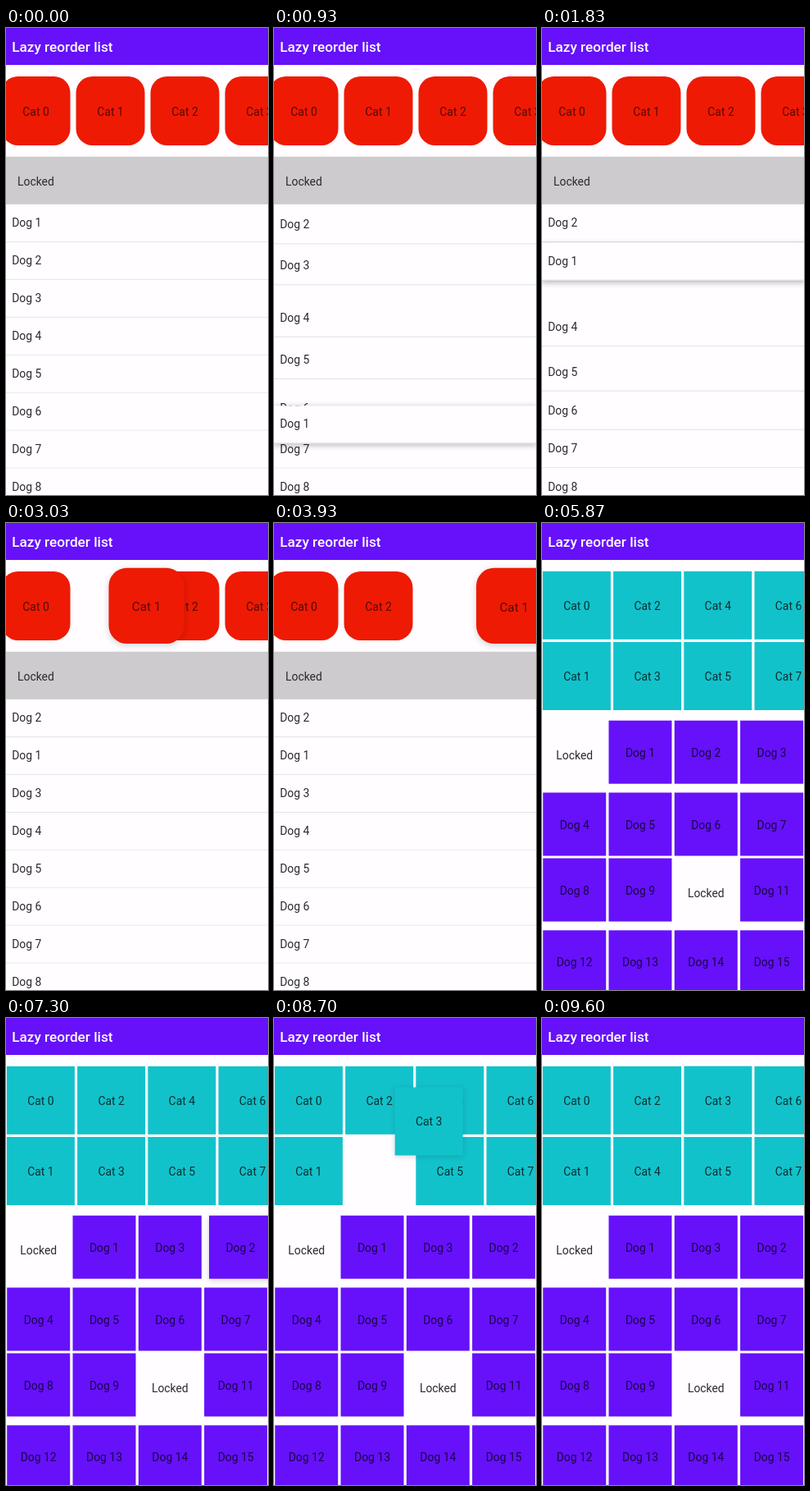
Animation of 320 by 569 pixels, one loop 9630 ms. Source, as an HTML page:

```html
<!DOCTYPE html>
<html lang="en">
<head>
<meta charset="utf-8">
<title>Lazy reorder list</title>
<style>
  html, body { margin: 0; width: 100%; height: 100%; overflow: hidden; background: #fffdff; }
  body { font: 13.9px Roboto, sans-serif; color: #2b292d; }
  section { position: absolute; inset: 0; overflow: hidden; }
  header, .item { position: absolute; display: flex; align-items: center; box-sizing: border-box; white-space: pre; }
  header {
    left: 0; top: 0; width: 100%; height: 45px; padding: 1px 0 0 7.2px;
    background: #6611fa; color: #fff; font-weight: 500; font-size: 17.2px;
  }
  .item { left: 0; top: 0; justify-content: center; --shade: .14; }
  .row {
    width: 320px; height: 45.9px; padding-left: 7.2px; justify-content: flex-start;
    background: #fffdff; border-bottom: 1px solid #e3e1e6; --shade: .28;
  }
  .bar { width: 320px; height: 58.4px; padding: 1.5px 0 0 14px; justify-content: flex-start; background: #cecbce; }
  .pill { width: 84px; height: 84px; padding-top: 1px; border-radius: 20px; background: #ee1a04; color: #560a02; }
  .teal { width: 83px; height: 83px; background: #12c2cb; color: #07302f; }
  .violet { width: 77px; height: 77px; background: #6611fa; color: #1a0548; }
  .lock { width: 77px; height: 84.5px; }
</style>
</head>
<body>
<section id="list"></section>
<section id="grid"></section>
<header>Lazy reorder list</header>
<script>
const LOOP = 9630, CUT = 5870;
const ROW = 45.9, PILL = 91, TEAL = 86.2, VIOLET = 80.3;
const list = document.getElementById('list'), grid = document.getElementById('grid');
const items = [];

// Critically damped spring, 0 to 1, from a time difference in ms
function spring(ms) {
  const k = Math.max(0, ms) / 50;
  return 1 - (1 + k) * Math.exp(-k);
}

// Smooth curve through key points [time, value]
function follow(keys, t) {
  const last = keys.length - 1;
  if (t <= keys[0][0]) return keys[0][1];
  if (t >= keys[last][0]) return keys[last][1];
  const i = keys.findIndex(k => k[0] > t) - 1;
  const slope = j => j <= 0 || j >= last ? 0 :
    (keys[j + 1][1] - keys[j - 1][1]) / (keys[j + 1][0] - keys[j - 1][0]);
  const [t0, a] = keys[i], [t1, b] = keys[i + 1];
  const span = t1 - t0, u = (t - t0) / span, v = 1 - u;
  return v * v * (1 + 2 * u) * a + u * u * (3 - 2 * u) * b
    + span * u * v * (v * slope(i) - u * slope(i + 1));
}

// A drag moves along (dx, dy), its path counted in slots; it ends one slot on
function makeDrag(dx, dy, grow, path) {
  return { dx, dy, grow, path, start: path[0][0], end: path[path.length - 1][0] };
}

// Times at which the k-th neighbour gives way to the dragged item, or returns
function swapTimes({ path, start, end }, k) {
  const times = [];
  for (let t = start; k > 0 && t < end; t++) {
    const away = times.length % 2;
    const past = follow(path, t) > k - away + .05;
    if (past !== !!away) times.push(t);
  }
  return times;
}

// k: place counted from the dragged item, which is 0
function add(view, cls, text, x, y, drag, k) {
  const el = document.createElement('div');
  el.className = 'item ' + cls;
  el.textContent = text;
  view.append(el);
  items.push({ el, x, y, drag, k, swaps: drag ? swapTimes(drag, k) : [] });
}

function place({ el, x, y, drag, k, swaps }, t) {
  let slots = 0, scale = 1;
  swaps.forEach((at, n) => slots += (n % 2 ? 1 : -1) * spring(t - at));
  if (k === 0) {
    const home = spring(t - drag.end), lift = spring(t - drag.start) - home;
    const p = follow(drag.path, t);
    slots = p + (1 - p) * home;
    scale += drag.grow * lift;
    el.style.zIndex = lift > .001 ? 1 : 0;
    el.style.boxShadow = `0 2px 7px 1px rgb(0 0 0 / calc(var(--shade) * ${lift.toFixed(4)}))`;
  }
  if (drag) {
    x += slots * drag.dx;
    y += slots * drag.dy;
  }
  el.style.transform = `translate(${x}px,${y}px) scale(${scale})`;
}

const rowDrag = makeDrag(0, ROW, 0, [[430, 0], [690, 1.05], [755, 2.05], [849, 3.05], [866, 4.05], [930, 5.33],
  [1150, 6.55], [1480, 5.05], [1590, 3.05], [1693, 2.05], [1820, 1.05], [2000, .87]]);
const pillDrag = makeDrag(PILL, 0, .1, [[2700, 0], [3300, 1.05], [3930, 1.82], [4500, 2.25], [5100, 1.05], [5590, .6]]);
const violetDrag = makeDrag(VIOLET, 0, 0, [[6200, 0], [6750, 1.05], [6950, 1.3], [7330, 1.07]]);
const tealDrag = makeDrag(TEAL, -TEAL, 0, [[8370, 0], [8850, 1.05], [9100, 1.1], [9340, 1.06]]);

// List screen
for (let i = 0; i < 4; i++) add(list, 'pill', 'Cat ' + i, -5.5 + PILL * i, 58.9, pillDrag, i - 1);
add(list, 'bar', 'Locked', 0, 156.8);
for (let i = 0; i < 8; i++) add(list, 'row', 'Dog ' + (i + 1), 0, 215.2 + ROW * i, rowDrag, i);

// Grid screen; a locked cell makes its row taller
for (let i = 0; i < 8; i++)
  add(grid, 'teal', 'Cat ' + i, .9 + TEAL * (i >> 1), 58.8 + TEAL * (i % 2), tealDrag, i - 3);
for (let i = 0; i < 16; i++) {
  const x = 1.2 + VIOLET * (i % 4), row = i >> 2, y = 240.7 + 80 * row + 7.8 * Math.ceil(row / 2);
  if (i % 10) add(grid, 'violet', 'Dog ' + i, x, y, violetDrag, i - 2);
  else add(grid, 'lock', 'Locked', x, y);
}

const start = performance.now();
function frame() {
  const t = (performance.now() - start) % LOOP;
  list.style.display = t < CUT ? '' : 'none';
  grid.style.display = t < CUT ? 'none' : '';
  items.forEach(item => place(item, t));
  requestAnimationFrame(frame);
}
frame();
</script>
</body>
</html>
```
